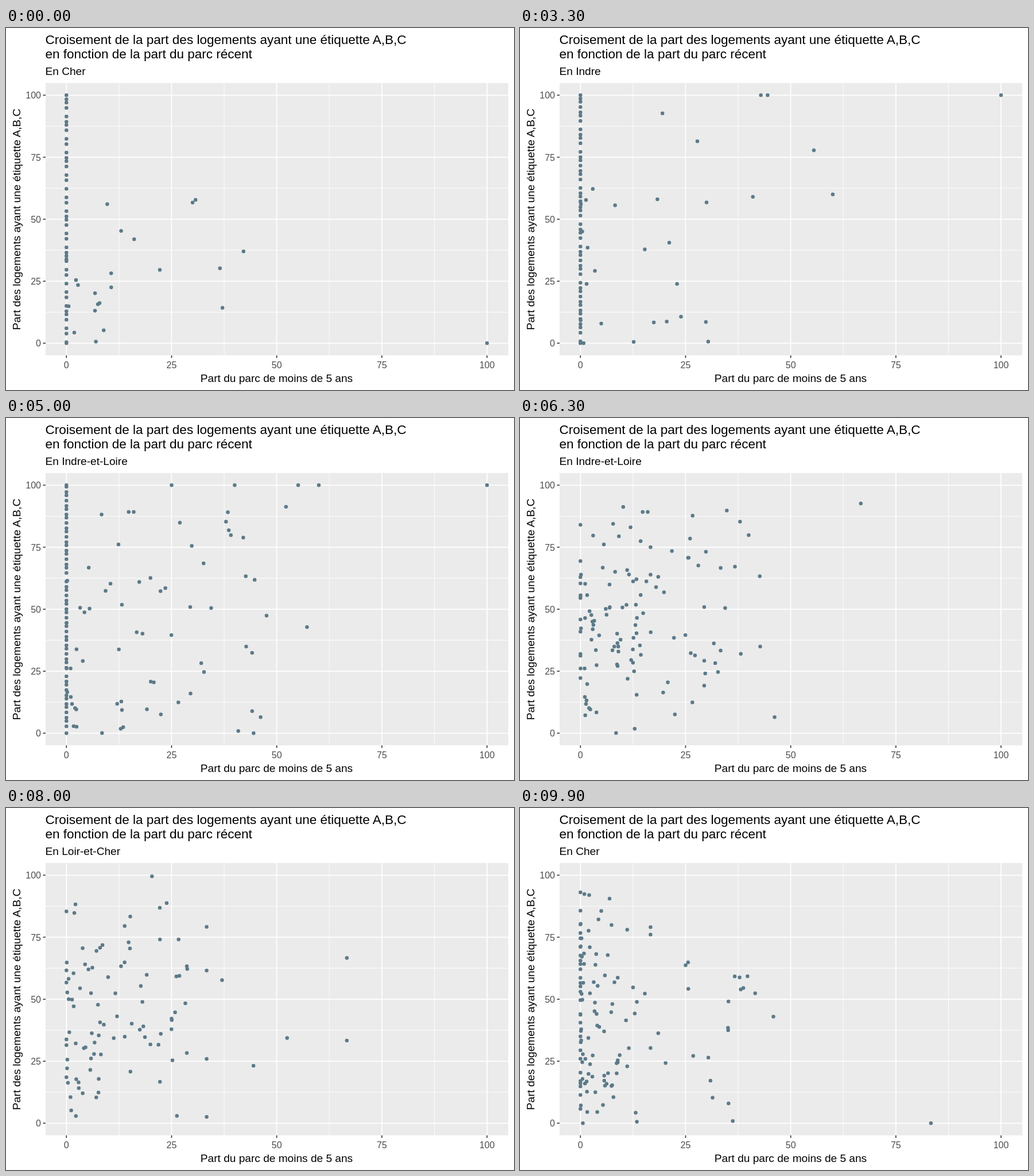
An HTML page that plays this animation: 885x632 px, repeating every 10000 ms.

```html
<!DOCTYPE html>
<html lang="fr">
<head>
<meta charset="utf-8">
<style>
  html, body { margin: 0; width: 100%; height: 100%; overflow: hidden; background: #fff; }
  svg { display: block; width: 885px; height: 632px; }
  text { font: 19.1px "Liberation Sans", Arial, sans-serif; }
  .title { font-size: 22.5px; }
  .label { font-size: 16px; fill: #4d4d4d; }
  .major { stroke: #fff; stroke-width: 1.7; }
  .minor { stroke: #fff; stroke-width: .9; }
  .tick { stroke: #333; stroke-width: 1.6; }
  #dots { fill: none; stroke: #5c7a89; stroke-width: 6.5; stroke-linecap: round; }
</style>
</head>
<body>
<svg viewBox="0 0 885 632">
  <text class="title" x="68.5" y="28">Croisement de la part des logements ayant une étiquette A,B,C</text>
  <text class="title" x="68.5" y="53">en fonction de la part du parc récent</text>
  <text id="subtitle" x="68.5" y="82"></text>
  <rect x="69" y="96" width="806" height="475.5" fill="#ebebeb"/>
  <g id="axes"></g>
  <path id="dots"/>
  <text x="471.5" y="618" text-anchor="middle">Part du parc de moins de 5 ans</text>
  <text transform="translate(25 334) rotate(-90)" text-anchor="middle">Part des logements ayant une étiquette A,B,C</text>
</svg>
<script>
const scaleX = v => 105.3 + 7.327 * v;
const scaleY = v => 550.3 - 4.33 * v;

// column: distinct dots on the zero line; cloud: random dots within reach (x) and top (y);
// landmarks: the few isolated dots, in percent.
const states = [
  { name: "Cher", column: 42, cloud: 13, reach: 12, top: 38,
    landmarks: [[100, 0], [30.7, 57.8], [30, 56.7], [9.7, 56.1], [13, 45.3], [16.1, 41.9],
      [42.1, 37], [36.5, 30.2], [22.2, 29.6], [37.1, 14.3]] },
  { name: "Eure-et-Loir", column: 36, cloud: 35, reach: 30, top: 78,
    landmarks: [[100, 100], [100, 0], [16.3, 93], [50, 80], [55.2, 78.9], [35, 78],
      [42.1, 57.9], [34.7, 57.2], [76.6, 40]] },
  { name: "Indre", column: 50, cloud: 23, reach: 36, top: 65,
    landmarks: [[100, 100], [42.9, 100], [44.5, 100], [19.5, 92.7], [27.8, 81.4], [55.5, 77.8],
      [60, 60], [41, 59]] },
  { name: "Indre-et-Loire", column: 54, cloud: 63, reach: 48, top: 90,
    landmarks: [[100, 100], [60, 100], [55.1, 100], [40, 100], [25, 100], [52.2, 91.3],
      [38.6, 81.8], [57.2, 42.8], [44.5, 0]] },
  { name: "Loir-et-Cher", column: 44, cloud: 35, reach: 46, top: 88,
    landmarks: [[100, 100], [100, 0], [30.5, 100], [33.3, 100], [40, 100], [55.5, 44.5],
      [78.7, 28.6], [50, 0], [66.7, 0]] },
  { name: "Loiret", column: 49, cloud: 72, reach: 48, top: 72,
    landmarks: [[100, 100], [100, 16.7], [100, 0], [21.4, 100], [56, 72.1], [66.7, 66.7],
      [77.5, 55], [78.8, 6], [75, 0], [66.7, 0]] }
];

const MIN_ROWS = 100;
const GOLDEN = .618034;
let seed = 7;
const random = () => (seed = seed * 16807 % 2147483647) / 2147483647;

// Dots with the same index in successive states are the same moving dot.
states.forEach((state, index) => {
  const cloud = Array.from({ length: state.cloud }, () =>
    [state.reach * random() ** 1.5, state.top * random() ** 1.4]);
  const spread = [...state.landmarks, ...cloud];
  const offset = random();
  const length = Math.max(state.column, MIN_ROWS - spread.length);
  const column = Array.from({ length }, (_, i) => {
    const k = i % state.column;
    return [0, k < 2 ? 100 * k : 100 * ((k * GOLDEN + offset) % 1)];
  });
  const rows = index % 2 ? [...column, ...spread] : [...spread, ...column];
  state.points = rows.map(([x, y]) => [scaleX(x), scaleY(y)]);
});

function drawAxes() {
  const line = (type, x1, y1, x2, y2) =>
    `<line class="${type}" x1="${x1}" y1="${y1}" x2="${x2}" y2="${y2}"/>`;
  const label = (x, y, anchor, value) =>
    `<text class="label" x="${x}" y="${y}" text-anchor="${anchor}">${value}</text>`;
  let minor = "", major = "";
  for (let v = 0; v <= 100; v += 12.5) {
    const x = scaleX(v), y = scaleY(v), isMajor = v % 25 === 0;
    const type = isMajor ? "major" : "minor";
    const grid = line(type, x, 96, x, 571.5) + line(type, 69, y, 875, y);
    if (isMajor) {
      major += grid + line("tick", x, 571.5, x, 576) + line("tick", 64.5, y, 69, y)
        + label(x, 593.5, "middle", v) + label(61, y + 6, "end", v);
    } else minor += grid;
  }
  document.getElementById("axes").innerHTML = minor + major;
}

const subtitle = document.getElementById("subtitle");
const dots = document.getElementById("dots");
const starts = [11, 28, 45, 62, 79, 95];
const STEPS = 6;

function render(tick) {
  const passed = starts.filter(start => tick >= start).length;
  const current = Math.max(0, passed - 1);
  const step = passed ? Math.min(STEPS, tick - starts[current] + 1) : 0;
  const progress = step / STEPS;
  const from = states[current], to = states[(current + 1) % states.length];

  // Dots without a partner appear or disappear when the next state is reached.
  const points = step === STEPS ? to.points : from.points.map(([x, y], i) => {
    const [endX, endY] = to.points[i] || [x, y];
    return [x + (endX - x) * progress, y + (endY - y) * progress];
  });
  dots.setAttribute("d", points.map(([x, y]) => `M${x.toFixed(2)} ${y.toFixed(2)}h0`).join(""));
  subtitle.textContent = "En " + (progress < .5 ? from : to).name;
}

let shown = -1;
function animate() {
  const tick = Math.floor(performance.now() % 10000 / 100);
  if (tick !== shown) render(shown = tick);
  requestAnimationFrame(animate);
}

drawAxes();
animate();
</script>
</body>
</html>
```
